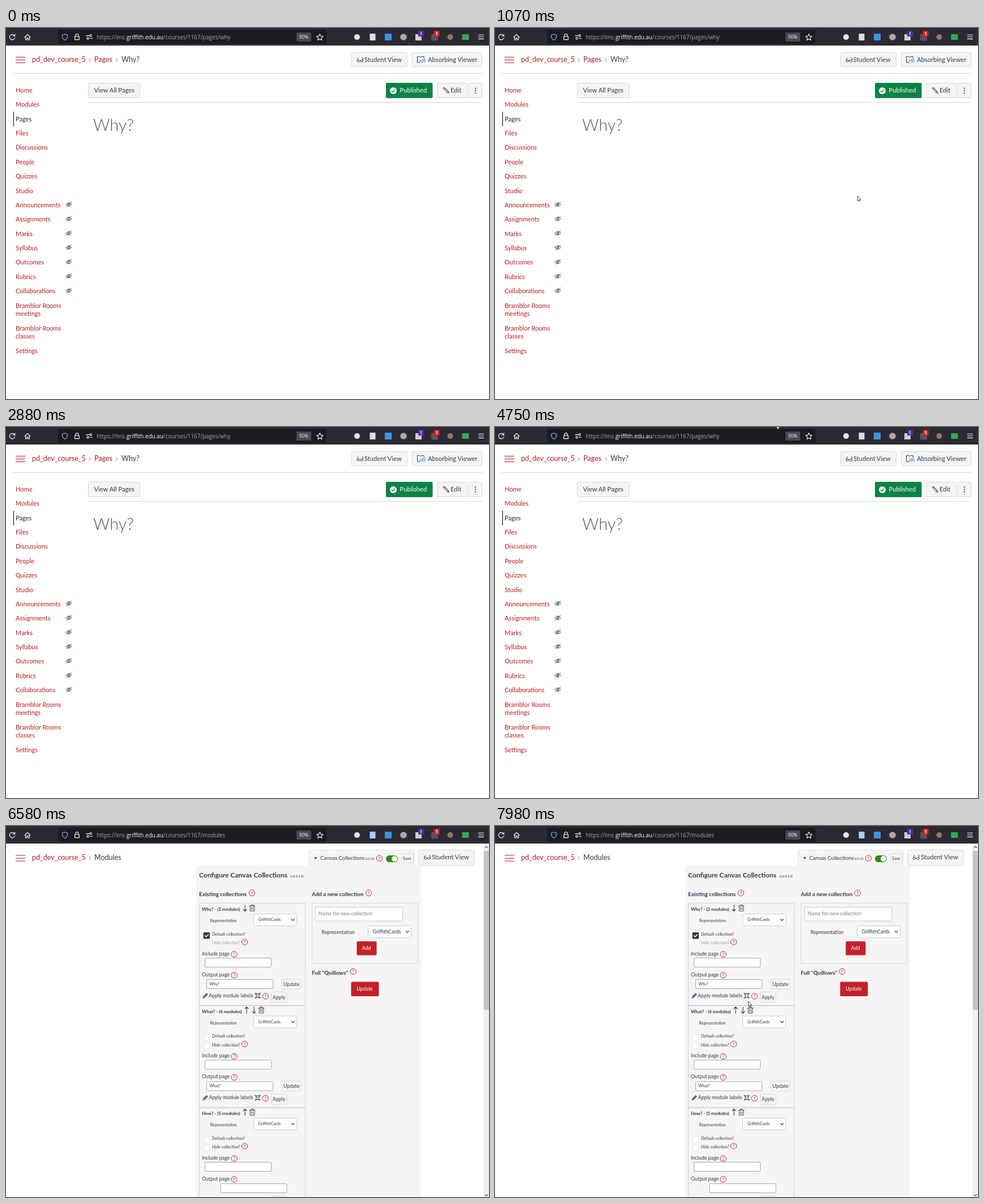
Recreate the animation shown at these times as an HTML page. Size 853x656 px, loop 8000 ms.

```html
<!DOCTYPE html>
<html lang="en">
<head>
<meta charset="utf-8">
<title>Course pages</title>
<style>
  html, body { margin: 0; width: 100%; height: 100%; overflow: hidden; background: #fff; }
  svg { display: block; }
  text { font-family: Lato, "Open Sans", sans-serif; white-space: pre; }
  .ui { font-family: "Open Sans", "Noto Sans", sans-serif; }
</style>
</head>
<body>
<svg id="stage" width="853" height="656" viewBox="0 0 853 656"></svg>
<script>
const RED = '#b9191f', INK = '#2d3b45', LINE = '#c7cdd1', PALE = '#f5f5f5';

// Drawing helpers: each returns SVG markup
const text = (x, y, size, str, fill = INK, extra = '') =>
  `<text x="${x}" y="${y}" font-size="${size}" fill="${fill}" ${extra}>${str}</text>`;
const bold = (x, y, size, str) => text(x, y, size, str, INK, 'font-weight="700"');
const rect = (x, y, w, h, fill, stroke = 'none', r = 0) =>
  `<rect x="${x}" y="${y}" width="${w}" height="${h}" rx="${r}" fill="${fill}" stroke="${stroke}"/>`;
const dot = (x, y, r, fill, stroke = 'none', w = 1) =>
  `<circle cx="${x}" cy="${y}" r="${r}" fill="${fill}" stroke="${stroke}" stroke-width="${w}"/>`;
const path = (d, stroke = INK, w = 1, fill = 'none') =>
  `<path d="${d}" fill="${fill}" stroke="${stroke}" stroke-width="${w}" stroke-linecap="round" stroke-linejoin="round"/>`;
const at = (x, y, body) => `<g transform="translate(${x} ${y})">${body}</g>`;
const button = (x, y, w, h) => rect(x + .5, y + .5, w - 1, h - 1, PALE, '#d3d7da', 2);
const field = (x, y, w, h, stroke = '#a3a8ac') => rect(x + .5, y + .5, w - 1, h - 1, '#fff', stroke, 1.5);

const help = (x, y) => dot(x, y, 5.2, 'none', RED, .9) +
  text(x, y + 3, 8.4, '?', RED, 'text-anchor="middle"');
const glasses = (x, y) => at(x, y,
  dot(2.6, 7.2, 2.1, 'none', INK, .9) + dot(8.8, 7.2, 2.1, 'none', INK, .9) +
  path('M.5 7L2.6 1.4M6.7 7h-2M10.9 7V2.2l-1.6-.8', INK, .9));
const hiddenEye = y => at(111, y,
  path('M-5 0Q0-6.4 5 0Q0 6.4-5 0ZM-4.2 4.2L4.6-4.6', INK, .9) + dot(0, 0, 1.7, 'none', INK, .9));
const upArrow = (x, y) => path(`M${x} ${y + 5.5}v-11m-3 3l3-3 3 3`, INK, 1.1);
const downArrow = (x, y) => path(`M${x} ${y - 5.5}v11m-3-3l3 3 3-3`, INK, 1.1);
const trash = (x, y) => at(x, y,
  path('M-5-3.5H5M-2-3.5V-5.5H2V-3.5M-3.8-3.5V5.3H3.8V-3.5M-1.3-1.2V3M1.3-1.2V3', INK, .9));
const chevron = (x, y) => path(`M${x - 2.6} ${y - 1.3}l2.6 2.6 2.6-2.6`, INK, 1.2);
const crumb = x => path(`M${x - 1.2} 53.8l2.6 2.8-2.6 2.8`, '#6b7780', 1);
const burger = y => path(`M17.5 ${y - 5}h16M17.5 ${y}h16M17.5 ${y + 5}h16`, RED, 1.1);

function select(x, y, size) {
  return rect(x + .5, y + .5, 76, 21, '#fff', LINE, 2) +
    text(x + 8.5, y + 11 + size * .32, size, 'GriffithCards') + chevron(x + 69.8, y + 11);
}

function browserBar(page, docColor) {
  const light = '#fbfbfe';
  return rect(0, 0, 853, 31, '#2b2a33') + rect(92, 3, 474, 25, '#1c1b22', 'none', 3) +
    path('M14.8 13.2A4.7 4.7 0 1 0 15.7 17M15.7 11.2v3h-3', light, 1.2) +
    path('M33 16.3l5-4.8 5 4.8M34.5 15.2v5.8h2.4v-3.4h2.2v3.4h2.4v-5.8', light, 1.1) +
    path('M104 10.8l4.7 1.7c.2 4.2-1 7-4.7 9-3.7-2-4.9-4.8-4.7-9z', '#7cb3ea', 1.1) +
    path('M123 15v-2.1a2.4 2.4 0 0 1 4.8 0V15M121.6 15h7.6v5.6h-7.6z', light, 1.2) +
    path('M141.5 13.6h5M148.5 18.2h4', light, 1.1) +
    dot(149.5, 13.6, 1.7, 'none', light, 1.1) + dot(144.5, 18.2, 1.7, 'none', light, 1.1) +
    text(160, 20, 9.9, `https://lms.<tspan fill="${light}">griffith.edu.au</tspan>/courses/1167/pages/why`
      .replace('pages/why', page), '#a5a4ac', 'class="ui"') +
    rect(513, 8, 26, 16, '#4a4953', 'none', 2) +
    text(526, 19.2, 8.3, '90%', light, 'class="ui" text-anchor="middle"') +
    path('M554.3 10.5l1.7 3.7 4 .5-3 2.8.8 4-3.5-2-3.5 2 .8-4-3-2.8 4-.5z', light, 1.1) +
    dot(620, 16, 5, '#e6e6ea') +
    rect(642.5, 10, 10, 12, docColor) + rect(669, 10, 12, 12, '#3d94dc') +
    dot(702, 16, 5.8, '#a9a9ab') +
    rect(723, 11, 11, 11, '#cfcfd3') + rect(728, 5, 10, 10, '#5b2aa8', 'none', 1) +
    text(733, 13.2, 8.5, '!', '#fff', 'class="ui" text-anchor="middle" font-weight="700"') +
    rect(751, 10.5, 12, 12, '#55545c', 'none', 2) + rect(755.5, 5, 10, 10, '#e0222b', 'none', 1) +
    text(760.5, 13.2, 8.2, '1', '#fff', 'class="ui" text-anchor="middle" font-weight="700"') +
    dot(784.5, 16, 5, '#8c7a68') + rect(805.5, 11, 12, 10, '#35a853') +
    path('M834.5 12.2h9M834.5 15.8h9M834.5 19.4h9', light, 1.1);
}

function sideNav() {
  const items = ['Home', 'Modules', 'Pages', 'Files', 'Discussions', 'People', 'Quizzes', 'Studio',
    'Announcements', 'Assignments', 'Marks', 'Syllabus', 'Outcomes', 'Rubrics', 'Collaborations'];
  const tail = [['Bramblor Rooms', 495], ['meetings', 509.3], ['Bramblor Rooms', 534.7],
    ['classes', 549], ['Settings', 574.6]];
  return items.map((name, i) => {
    const y = 110 + 25.37 * i;
    return text(17, y + 4, 11.1, name, i === 2 ? '#1f2b34' : RED) + (i > 7 ? hiddenEye(y - .9) : '');
  }).join('') + tail.map(([name, y]) => text(17, y, 11.1, name, RED)).join('') +
    rect(12.7, 148, 1.4, 26, INK);
}

function wikiPage() {
  return browserBar('pages/why', '#dcdcde') + burger(56.5) +
    text(46, 60, 12.5, 'pd_dev_course_5', RED) + crumb(148) +
    text(156, 60, 12.5, 'Pages', RED) + crumb(195.5) + text(204, 60, 12.5, 'Why?') +
    rect(12, 80, 829, 1, '#d3d7da') + sideNav() +
    button(610, 43, 99, 26) + glasses(619.5, 51) + text(633, 60, 11.2, 'Student View') +
    button(717, 43, 124, 26) +
    path('M731.5 61h-5V50.5h4.2l1.8 1.5 1.6-1.5h4V54', INK, 1) +
    path('M732.5 56.6h1.6l2-1.7v6l-2-1.7h-1.6zM738 56q1.2 1.8 0 3.8M739.6 54.6q2 3.3 0 6.6', '#2a8fd0', .9) +
    text(745, 60, 11.2, 'Absorbing Viewer') +
    button(145, 97, 92, 27) + text(155.5, 114, 11.2, 'View All Pages') +
    rect(671, 97, 82.5, 27, '#0b8346', 'none', 2) + dot(684, 111, 6, '#fff') +
    path('M681.2 111.2l2 2 3.6-4', '#0b8346', 1.4) + text(695.5, 114, 11.2, 'Published', '#fff') +
    button(761, 97, 54, 27) +
    path('M772.2 106.2l1.8-1.4 7.6 7.8.6 3-3-.8zM773.6 107.6l1.6-1.4M779.4 114.4l2-1.8M774.8 106.6l6 6.6', INK, .9) +
    text(785, 114, 11.2, 'Edit') +
    button(817, 97, 24, 27) + [106.6, 110.6, 114.6].map(y => dot(829, y, 1.1, INK)).join('') +
    rect(145, 131, 695, 1, '#d3d7da') +
    text(154, 182, 28.8, 'Why?', '#505a62', 'font-weight="300"');
}

function checkbox(y, on) {
  return on ? rect(348.5, y, 11.5, 11.5, INK, 'none', 1.5) + path(`M351.3 ${y + 5.8}l2.1 2.3 4-4.4`, '#fff', 1.4)
    : rect(349.5, y + .5, 10, 10, '#fff', '#e3e6e8', 1.5);
}

// One collection block, laid out for the first slot and shifted by dy
function collection(dy, { title, first, icons, output }) {
  const page = output
    ? field(354, 271, 118, 17) + text(359, 281.8, 7.1, output) +
      button(487, 270, 34.5, 19) + text(490, 282.5, 8.8, 'Update')
    : field(378.5, 271, 118, 17);
  return at(0, dy,
    bold(346, 150, 7.9, title) + icons +
    text(360.5, 170, 7.05, 'Representation') + select(437, 155, 7.05) +
    checkbox(188, first) + text(364, 193.6, 7.1, 'Default collection?') +
    (first ? '' : checkbox(203, false)) +
    text(364, 209.2, 7.1, 'Hide collection?', first ? '#9aa1a6' : INK) + help(421.5, 205) +
    text(346, 228.7, 8.9, 'Include page') + help(403, 226.8) + field(351, 233, 118, 17) +
    text(346, 265.7, 8.9, 'Output page') + help(403, 263.8) + page +
    path('M348 304l1-3 5.4-5.2 2 2-5.4 5.2z', INK, .8, '#3f78b5') +
    text(358.3, 302.8, 8.9, 'Apply module labels') +
    at(444.5, 300, path('M-4.3-4.2L-2.6-2.8M4.3-4.2L2.6-2.8M-4.3 4.2L-2.2 2.6M4.3 4.2L2.2 2.6', INK, 1.5) +
      path('M-3-1.5Q-3-4 0-4T3-1.5Q3 .6 1.7 1.3V3.2H-1.7V1.3Q-3 .6-3-1.5', INK, .9) +
      dot(-1.2, -1, .7, INK) + dot(1.2, -1, .7, INK)) +
    help(458.3, 301) + button(468, 293, 28.5, 19) + text(471, 305.8, 8.8, 'Apply'));
}

function modulesPage() {
  const blocks = [
    { title: 'Why? - (2 modules)', first: true, output: 'Why?', icons: downArrow(422, 145) + trash(435, 145) },
    { title: 'What? - (6 modules)', output: 'What?',
      icons: upArrow(425, 145) + downArrow(438, 145) + trash(451, 145) },
    { title: 'How? - (5 modules)', icons: upArrow(422, 145) + trash(435, 145) }
  ];
  return browserBar('modules', '#a8d0fa') + burger(57) +
    text(46, 60.3, 12.5, 'pd_dev_course_5', RED) + crumb(148) + text(156, 60.3, 12.5, 'Modules') +
    rect(336, 70, 397, 586, PALE) +
    rect(535, 42, 185.5, 29, PALE) + path('M535.5 70V42.5H720.5V70', '#dcdfe1', 1) +
    path('M545 55.4h4l-2 3z', INK, .6, INK) + text(555, 60.3, 9.5, 'Canvas Collections') +
    text(635, 60.3, 4.7, '(0.8.12)') + help(659.5, 57) +
    rect(671, 52, 21, 12, '#2b8a0f', 'none', 6) + dot(686, 58, 5, '#fff') +
    button(698, 48, 22, 18) + text(701, 59.5, 7.1, 'Save') +
    button(728.5, 42, 99, 28.5) + glasses(738, 50) + text(752, 59.2, 11.2, 'Student View') +
    bold(341, 91, 12, 'Configure Canvas Collections') + text(502, 91, 6.2, '(v0.8.12)') +
    bold(341, 123.8, 9.85, 'Existing collections') + help(434.3, 118.5) +
    path('M341.5 660V136.5H528.5V660', '#cfd3d6', 1) +
    rect(341, 317, 188, 1, '#b9bec2') + rect(341, 497.5, 188, 1, '#b9bec2') +
    blocks.map((b, i) => collection(180.5 * i, b)).join('') +
    bold(540, 123.8, 9.85, 'Add a new collection') + help(640.3, 118.5) +
    rect(540.5, 136.5, 187, 106.5, 'none', '#d3d7da') +
    field(546, 143, 155, 25.5, LINE) + text(552, 158.3, 8.9, 'Name for new collection', '#78838b') +
    text(557.5, 191.2, 8.75, 'Representation') + select(639, 176, 8.85) +
    rect(619.5, 204, 35, 24.5, '#c3212a', 'none', 2) + text(628.4, 219.3, 9.1, 'Add', '#fff') +
    bold(540, 262.5, 9.85, 'Full "Quillows"') + help(613, 257.3) +
    rect(609.5, 275.5, 49, 25.5, '#c3212a', 'none', 2) + text(619.2, 291.2, 8.9, 'Update', '#fff') +
    rect(843, 31, 10, 625, '#f1f1f1') + rect(844, 44, 9, 281, '#c4c4c4') +
    path('M846 38.6l2.5-2.6 2.5 2.6M846 651.5l2.5 2.6 2.5-2.6', '#55585a', 1.2);
}

const stage = document.getElementById('stage');
stage.innerHTML = `<g id="wiki">${wikiPage()}</g><g id="modules">${modulesPage()}</g><g id="pointer">` +
  path('M.5.6V8.7L2.4 7 3.7 9.9 4.9 9.4 3.7 6.6H6.2Z', '#25252b', .8, '#fff') + '</g>';
const [wiki, modules, pointer] = ['wiki', 'modules', 'pointer'].map(id => document.getElementById(id));

// Pointer moves: start, end, number of steps, cubic curve as x,y pairs
const LOOP = 8000, PAGE_SWITCH = 6580;
const moves = [
  [250, 580, 6, [797, 628, 755, 510, 682, 335, 654, 304]],
  [790, 1070, 5, [654, 309, 654, 322, 645, 305, 640, 297]],
  [1460, 2200, 12, [641, 292, 662, 240, 630, 150, 607, 108]],
  [2600, 2880, 5, [606, 100, 598, 70, 588, 30, 576, -14]],
  [4750, 5550, 11, [497, -5, 495, 79, 425, 79, 418, -14]],
  [6970, 7730, 12, [488, 7, 470, 90, 400, 190, 353, 269]],
  [7800, 7980, 4, [380, 278, 470, 300, 475, 312, 447, 310]]
];

function pointerAt(t) {
  const move = moves.filter(m => m[0] <= t).pop();
  if (!move) return [0, -20];
  const [start, end, steps, p] = move;
  const last = steps - 1;
  const u = Math.min(last, Math.floor((t - start) / (end - start) * last + 1e-6)) / last, v = 1 - u;
  return [0, 1].map(i => v * v * v * p[i] + 3 * v * v * u * p[i + 2] + 3 * v * u * u * p[i + 4] + u * u * u * p[i + 6]);
}

const began = performance.now();
function draw() {
  const t = (performance.now() - began) % LOOP;
  const switched = t >= PAGE_SWITCH;
  wiki.style.display = switched ? 'none' : '';
  modules.style.display = switched ? '' : 'none';
  pointer.setAttribute('transform', `translate(${pointerAt(t).map(n => n.toFixed(1)).join(' ')})`);
  requestAnimationFrame(draw);
}
draw();
</script>
</body>
</html>
```
